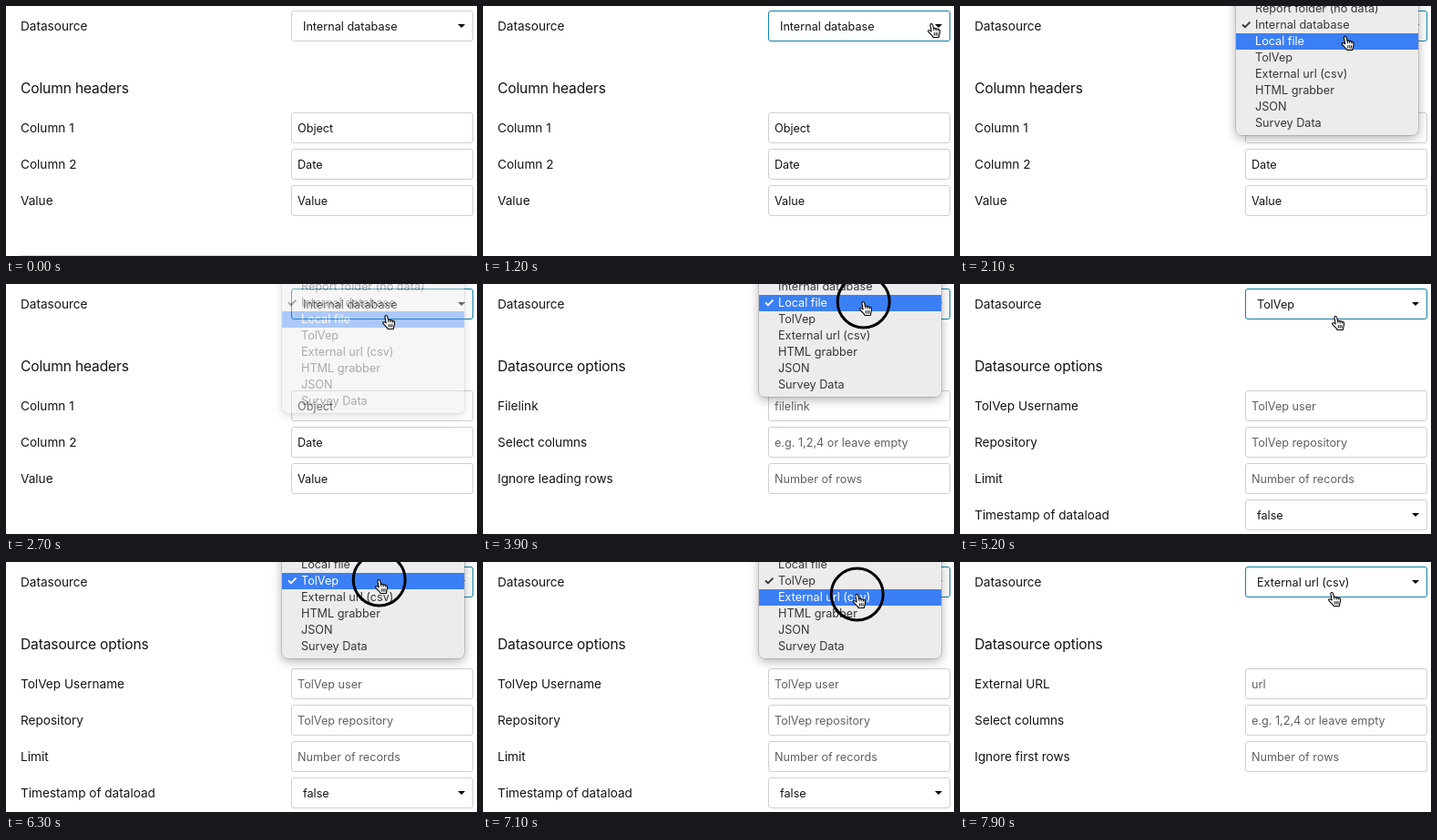
Animation, 517 px wide and 275 px high, one loop 8000 ms. Source, as an HTML page:

```html
<!DOCTYPE html>
<html lang="en">
<head>
<meta charset="utf-8">
<title>Datasource form</title>
<style>
html, body { margin: 0; width: 100%; height: 100%; overflow: hidden; background: #fff; }
#stage {
  position: relative; width: 517px; height: 275px; overflow: hidden; background: #fff;
  font: 12.65px/34px Inter, Roboto, sans-serif; color: #141414;
  white-space: nowrap; cursor: default;
}
#stage div { position: absolute; box-sizing: border-box; }
#stage .edge { right: 0; top: 0; width: 1px; height: 275px; background: #f5f5f5; }
#stage .rule { left: 16px; top: 274px; width: 496px; height: 1px; background: #d9d9d9; }
#stage .label { left: 16px; font-size: 13.6px; }
#stage .head { left: 16px; top: 74px; font-size: 15.6px; letter-spacing: -.15px; }
#stage .field {
  left: 313px; width: 200px; height: 34px; padding-left: 6px;
  border: 1px solid #cdd0d3; border-radius: 3px; background: #fff;
}
#stage .hint { color: #606060; }
#stage .select { padding-left: 12px; }
#stage .select::after {
  content: ""; position: absolute; left: 182px; top: 14px;
  border: solid transparent; border-width: 4.5px 4.5px 0; border-top-color: #000;
}
#stage .focus { border-color: #1683ad; box-shadow: 0 0 0 1px rgba(0, 124, 186, .05); }
#stage .menu {
  left: 303px; top: -30px; width: 200px; background: #ececec; border-radius: 6px;
  box-shadow: 0 0 0 .5px rgba(0, 0, 0, .25), 0 3px 12px rgba(0, 0, 0, .32);
  color: #363636; line-height: 17px;
}
#stage .item { left: 0; width: 200px; height: 18px; padding-left: 21px; }
#stage .on { background: #3b7ff5; color: #fff; }
#stage .tick { left: 5px; top: 0; font-size: 13.5px; font-weight: 700; }
svg { position: absolute; left: 0; top: 0; }
</style>
</head>
<body>
<div id="stage">
  <div id="form"></div>
  <div id="popup"></div>
  <svg width="517" height="275">
    <circle id="ring" r="28.5" fill="none" stroke="#000" stroke-width="3"/>
    <g id="hand" stroke="#000" stroke-width="1.1" stroke-linejoin="round" stroke-linecap="round">
      <path fill="#fff" d="M5.2 9.5L4 3.2C3.8 2 4.2 1.1 5 1C5.9 .9 6.4 1.6 6.7 2.7L7.6 6.3C8 5.6 9.6 5.5 10 6.6C10.6 5.9 12 6.1 12.3 7.2C13.2 6.7 14.2 7.2 14.4 8.3C14.8 10.5 14.4 11.7 13.9 13L13.3 16H7.2C6.7 14.6 4.8 13 3.4 11.5C2 10.2 1.2 9.6 1.5 8.8C2 7.8 3.6 8.3 5.2 9.5Z"/>
      <path fill="none" stroke-width=".9" d="M7.6 6.3L8 8.4M10 6.6L10.3 8.6M12.3 7.2L12.4 8.8M8.3 11V13.8M10.2 11V13.8M12 11V13.8"/>
    </g>
    <path id="arrow" fill="#000" stroke="#fff" d="M4 .5V14L7 11.2L9 16L11.3 15L9.3 10.3H13.4Z"/>
  </svg>
</div>
<script>
const LOOP = 8000, STEP = 100;
const $ = id => document.getElementById(id);

const items = ["Report folder (no data)", "Internal database", "Local file", "TolVep",
  "External url (csv)", "HTML grabber", "JSON", "Survey Data"];

// Rows: label, content, kind of field
const forms = [
  { from: 0, pick: 1, head: "Column headers", rows: [
    ["Column 1", "Object", ""], ["Column 2", "Date", ""], ["Value", "Value", ""]] },
  { from: 2800, pick: 2, head: "Datasource options", rows: [
    ["Filelink", "filelink", "hint"],
    ["Select columns", "e.g. 1,2,4 or leave empty", "hint"],
    ["Ignore leading rows", "Number of rows", "hint"]] },
  { from: 5200, pick: 3, head: "Datasource options", rows: [
    ["TolVep Username", "TolVep user", "hint"],
    ["Repository", "TolVep repository", "hint"],
    ["Limit", "Number of records", "hint"],
    ["Timestamp of dataload", "false", "select"]] },
  { from: 7600, pick: 4, head: "Datasource options", rows: [
    ["External URL", "url", "hint"],
    ["Select columns", "e.g. 1,2,4 or leave empty", "hint"],
    ["Ignore first rows", "Number of rows", "hint"]] }
];

// Menu opens, starts to fade
const menus = [[1500, 2600], [3900, 5000], [6300, 7400]];
const FADE = 172;
const clicks = [[1500, 1700], [2400, 2600], [3900, 4000], [4800, 5000], [6300, 6400], [7100, 7300]];

// Pointer moves: start, end, x, y at the end
const start = [489, 69];
const moves = [[500, 1200, 495, 27], [1600, 2200, 420, 42], [3100, 3400, 420, 27],
  [4100, 4700, 415, 43], [5800, 6200, 412, 27], [6600, 7000, 413, 43], [7300, 7700, 411, 41]];

const ease = p => p * p * (3 - 2 * p);

function pointer(t) {
  let [x, y] = start;
  for (const [a, b, tx, ty] of moves) {
    const p = ease(Math.min(1, Math.max(0, (t - a) / (b - a))));
    x += (tx - x) * p;
    y += (ty - y) * p;
  }
  return [x, y];
}

const box = (cls, top, text, inner = "") =>
  `<div class="${cls}" style="top:${top}px">${inner}${text}</div>`;

function drawForm(t, form) {
  let html = '<div class="edge"></div>' + box("label", 5, "Datasource") +
    box("field select" + (t >= 1000 ? " focus" : ""), 5, items[form.pick]) +
    `<div class="head">${form.head}</div>`;
  form.rows.forEach(([label, text, kind], i) => {
    const y = 117 + 40 * i;
    html += box("label", y, label) + box("field " + kind, y, text);
  });
  if (t < 100) html += '<div class="rule"></div>';
  $("form").innerHTML = html;
}

function drawMenu(t, pick, tipY) {
  const menu = menus.find(([a, b]) => t >= a && t < b + FADE);
  if (!menu) {
    $("popup").innerHTML = "";
    return false;
  }
  const alpha = Math.min(1, 1 - (t - menu[1]) / FADE);
  let html = "";
  items.forEach((name, i) => {
    const y = 12 + 18 * (i - pick);
    if (y < -18) return;
    const on = tipY >= y && tipY < y + 18;
    const tick = i === pick ? '<div class="tick">✓</div>' : "";
    html += box("item" + (on ? " on" : ""), y + 30, name, tick);
  });
  const height = 30 + 16 + 18 * (items.length - pick);
  $("popup").innerHTML = `<div class="menu" style="height:${height}px;opacity:${alpha}">${html}</div>`;
  return true;
}

function show(el, on, x, y) {
  el.style.display = on ? "" : "none";
  el.setAttribute("transform", `translate(${x} ${y})`);
}

function draw(t) {
  const form = forms.filter(f => t >= f.from).pop();
  const [x, y] = pointer(t);
  const tipX = x - 4, tipY = y - 8;
  drawForm(t, form);
  const open = drawMenu(t, form.pick, tipY);
  const hand = open || tipY < 39;
  show($("hand"), t >= 600 && hand, x - 8, y - 8.5);
  show($("arrow"), t >= 600 && !hand, x - 8, y - 8.5);
  show($("ring"), clicks.some(([a, b]) => t >= a && t < b), tipX + 1.7, tipY + .5);
}

let last = -1;
function tick() {
  const t = Math.floor(performance.now() % LOOP / STEP) * STEP;
  if (t !== last) draw(last = t);
  requestAnimationFrame(tick);
}
tick();
</script>
</body>
</html>
```
